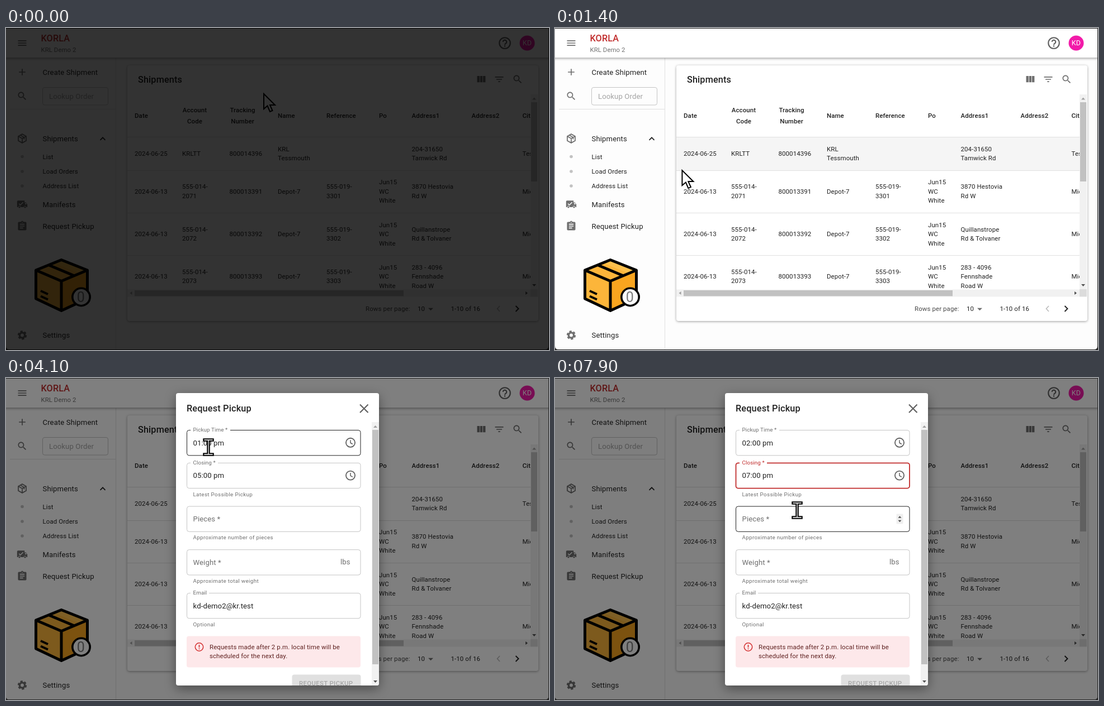
These frames come from a looping animation (971 px wide and 577 px high, 8 s). An HTML page:

```html
<!DOCTYPE html>
<html lang="en">
<head>
<meta charset="utf-8">
<title>Request Pickup</title>
<style>
html,body{margin:0;width:100%;height:100%;overflow:hidden;background:#222}
svg{display:block;width:971px;height:577px}
text{font-family:Roboto,Arial,sans-serif;white-space:pre}
.bar{filter:drop-shadow(0 2px 2px rgba(0,0,0,.32))}
.card{filter:drop-shadow(0 1px 2px rgba(0,0,0,.38))}
.paper{filter:drop-shadow(0 6px 10px rgba(0,0,0,.4))}
</style>
</head>
<body>
<svg id="stage" viewBox="0 0 971 577" xmlns="http://www.w3.org/2000/svg">
  <defs>
    <clipPath id="win"><path d="M0 1H970V570Q970 576 964 576H6Q0 576 0 570Z"/></clipPath>
    <clipPath id="tableClip"><rect x="217" y="119" width="721" height="349"/></clipPath>
    <clipPath id="itemClip"><rect x="7" y="336" width="189" height="39"/></clipPath>
    <clipPath id="paperClip"><rect x="304" y="27" width="363" height="524" rx="4"/></clipPath>
  </defs>
</svg>
<script>
const NS = 'http://www.w3.org/2000/svg';
const INK = '#212121', GREY = '#6f6f6f', RED = '#c02b2b', SOFT = '#c4c4c4';
const REM = 13.1, SMALL = 11.45, TINY = 9.83;

function el(parent, tag, attrs = {}, str) {
  const n = document.createElementNS(NS, tag);
  for (const k in attrs) n.setAttribute(k, attrs[k]);
  if (str !== undefined) n.textContent = str;
  return parent.appendChild(n);
}
const set = (n, attrs) => { for (const k in attrs) n.setAttribute(k, attrs[k]); };
const show = (n, on) => n.setAttribute('visibility', on ? 'visible' : 'hidden');
const rect = (p, x, y, width, height, fill, more) => el(p, 'rect', { x, y, width, height, fill, ...more });
const path = (p, d, fill, more) => el(p, 'path', { d, fill, ...more });
const circle = (p, cx, cy, r, fill, more) => el(p, 'circle', { cx, cy, r, fill, ...more });
const line = (p, d, stroke, w = 1, more) => path(p, d, 'none', { stroke, 'stroke-width': w, ...more });

// Text placed by the middle of its capitals.
function text(p, x, cy, str, size = REM, fill = INK, more) {
  return el(p, 'text', { x, y: cy + size * 0.355, 'font-size': size, fill,
    'letter-spacing': size * 0.0095, ...more }, str);
}
const bold = { 'font-weight': 500 };
const mid = { 'text-anchor': 'middle' };
// 24-unit icon cell centred on a point.
const icon = (p, cx, cy, size) => el(p, 'g', {
  transform: `translate(${cx - size / 2} ${cy - size / 2}) scale(${size / 24})` });

const GLASS = 'M15.5 14h-.79l-.28-.27C15.41 12.59 16 11.11 16 9.5 16 5.91 13.09 3 9.5 3S3 5.91 3 9.5 5.91 16 9.5 16c1.61 0 3.09-.59 4.23-1.57l.27.28v.79l5 4.99L20.49 19zM9.5 14C7.01 14 5 11.99 5 9.5S7.01 5 9.5 5 14 7.01 14 9.5 11.99 14 9.5 14z';
const BOARD = 'M19 3h-4.18C14.4 1.84 13.3 1 12 1s-2.4.84-2.82 2H5c-1.1 0-2 .9-2 2v14c0 1.1.9 2 2 2h14c1.1 0 2-.9 2-2V5c0-1.1-.9-2-2-2zm-7 0c.55 0 1 .45 1 1s-.45 1-1 1-1-.45-1-1 .45-1 1-1zm2 14H7v-2h7zm3-4H7v-2h10zm0-4H7V7h10z';
const tri = (p, x, y, w, h, fill = '#505050') => path(p, `M${x - w} ${y + h / 2}L${x} ${y - h / 2}L${x + w} ${y + h / 2}Z`, fill);
const side = (p, x, y, w, fill = '#505050') => path(p, `M${x - w / 2} ${y - 3}L${x + w / 2} ${y}L${x - w / 2} ${y + 3}Z`, fill);

const stage = document.getElementById('stage');
rect(stage, 0, 0, 971, 577, '#222');
const win = el(stage, 'g', { 'clip-path': 'url(#win)' });
rect(win, 0, 0, 971, 577, '#fdfdfd');

// Sidebar
rect(win, 196, 54, 1, 523, '#e0e0e0');
const itemHover = rect(win, 7, 336, 189, 39, '#000', { opacity: 0.055 });
const ripple = circle(el(win, 'g', { 'clip-path': 'url(#itemClip)' }), 115, 346, 18, '#000');
path(icon(win, 29, 79, 20), 'M19 13h-6v6h-2v-6H5v-2h6V5h2v6h6z', GREY);
text(win, 65.5, 79, 'Create Shipment');
path(icon(win, 29, 122, 20), GLASS, GREY);
rect(win, 65.5, 106.5, 117, 31.5, 'none', { rx: 3.5, stroke: SOFT });
text(win, 77, 122, 'Lookup Order', REM, '#a3a3a3');
rect(win, 7, 145, 189, 1, '#e0e0e0');
line(icon(win, 29, 198, 21), 'M12 3 20 7.5v9L12 21 4 16.5v-9zM4 7.5l8 4.5 8-4.5M12 12v9M8 5.2l8 4.6v4', GREY, 2);
text(win, 65.5, 198, 'Shipments');
line(win, 'M168.5 200.8L173 196.3L177.500 200.8', INK, 1.7);
['List', 'Load Orders', 'Address List'].forEach((s, i) => {
  const y = [230.500, 257, 283][i];
  circle(win, 29, y, 2.8, '#c2c2c2');
  text(win, 65.5, y, s, SMALL);
});
const truck = icon(win, 29, 316, 20);
path(truck, 'M3 4h14v4h3l3 4v6H1V6q0-2 2-2z', GREY);
line(truck, 'M5 10.500l3 3 6-6', '#fff', 1.8);
path(truck, 'M18 9.500h2l2 2.500h-4z', '#fff');
for (const x of [6, 18]) circle(truck, x, 18, 2.4, GREY, { stroke: '#fdfdfd', 'stroke-width': 1 });
text(win, 65.5, 316, 'Manifests');
path(icon(win, 29, 355, 20), BOARD, GREY);
text(win, 65.5, 355, 'Request Pickup');
const gear = icon(win, 29, 550.500, 20);
circle(gear, 12, 12, 5.5, 'none', { stroke: GREY, 'stroke-width': 4 });
circle(gear, 12, 12, 8.3, 'none', { stroke: GREY, 'stroke-width': 3, 'stroke-dasharray': '5 3.69' });
text(win, 65.5, 550.500, 'Settings');

// Parcel with counter
path(win, 'M99 416L146 434V485L99 506.500L53.500 485V434Z', '#fcb53a');
path(win, 'M99 454L146 434V485L99 506.500Z', '#f9a51f');
path(win, 'M86 421L98 416.500L146 434L133 440Z', '#fdc04d');
line(win, 'M99 415.500L145.500 434V485L99 506.500L53.500 485V434ZM53.500 434L99 453.500L145.500 434M99 453.500V506.500M77 425L121 443.500',
  '#000', 5, { 'stroke-linejoin': 'round' });
line(win, 'M62 471L75 477M62 480.500L75 486.500', '#000', 4);
circle(win, 134.500, 482, 15.700, '#fff', { stroke: '#000', 'stroke-width': 3.600 });
text(win, 134, 482, '0', 25, '#7a7a7a', mid);

// Top bar
rect(win, -10, -10, 991, 63, '#fff', { class: 'bar' });
path(icon(win, 29, 27, 20), 'M3 18h18v-2H3zm0-5h18v-2H3zm0-7v2h18V6z', GREY);
text(win, 62.500, 18.500, 'KORLA', 16.2, RED, bold);
text(win, 62.500, 39, 'KRL Demo 2', 11.3, '#707070');
const help = icon(win, 892, 27, 26);
circle(help, 12, 12, 9, 'none', { stroke: '#616161', 'stroke-width': 2 });
line(help, 'M9 10a3 3 0 1 1 4.800 2.400Q12 13.600 12 15M12 16v2', '#616161', 2);
circle(win, 932, 27, 13.500, '#f21ba9');
text(win, 932, 27, 'KD', 12.500, '#fff', mid);

// Table card
rect(win, 217, 67, 735, 458, '#fff', { rx: 4, class: 'card' });
text(win, 236, 92, 'Shipments', 16.2, INK, bold);
path(icon(win, 849.500, 92, 21), 'M10 18h5V5h-5zM4 18h5V5H4zM16 5v13h5V5z', GREY);
path(icon(win, 882, 92, 20), 'M10 18h4v-2h-4zM3 6v2h18V6zm3 7h12v-2H6z', GREY);
path(icon(win, 915, 92, 20), GLASS, GREY);

const table = el(win, 'g', { 'clip-path': 'url(#tableClip)' });
const rowTop = [195, 255, 331, 407, 483];
const rowHover = rect(table, 217, 0, 721, 60, '#000', { opacity: 0.04 });
const colX = [230, 315, 399.500, 486, 573, 667, 725.500, 832.500, 923.500];
['Date', '', '', 'Name', 'Reference', 'Po', 'Address1', 'Address2', 'City'].forEach((s, i) =>
  text(table, colX[i], 156.500, s, SMALL, INK, bold));
[[337.500, 'Account', 'Code'], [423, 'Tracking', 'Number']].forEach(([x, a, b]) => {
  text(table, x, 146.500, a, SMALL, INK, { ...bold, ...mid });
  text(table, x, 166.500, b, SMALL, INK, { ...bold, ...mid });
});
const po = 'Jun15|WC|White';
const order = (n, addr) => ['2024-06-13', '555-014-|207' + n, '80001339' + n, 'Depot-7',
  '555-019-|330' + n, po, addr, '', 'Midwell'];
const rows = [
  ['2024-06-25', 'KRLTT', '800014396', 'KRL|Tessmouth', '', '', '204-31650|Tamwick Rd', '', 'Tessmouth'],
  order(1, '3870 Hestovia|Rd W'),
  order(2, 'Quillanstrope|Rd & Tolvaner'),
  order(3, '283 - 4096|Fennshade|Road W')
];
rows.forEach((row, r) => {
  const cy = [225, 292.500, 369, 445][r];
  rect(table, 217, rowTop[r], 721, 1, '#e0e0e0');
  row.forEach((cell, c) => {
    const parts = cell.split('|');
    parts.forEach((s, i) => text(table, colX[c], cy + (i - (parts.length - 1) / 2) * 16.500, s, SMALL));
  });
});

rect(win, 938, 119, 13, 349, '#f1f1f1');
rect(win, 939, 133, 11, 142, '#c1c1c1');
tri(win, 944.500, 126.500, 3.500, 4, '#a0a0a0');
tri(win, 944.500, 461, 3.500, -4);
rect(win, 217, 468.500, 721, 13, '#f1f1f1');
rect(win, 230, 470, 481, 10.500, '#c1c1c1');
side(win, 223.500, 475, -4, '#a0a0a0');
side(win, 931, 475, 4);
rect(win, 938, 468, 13, 13.500, '#dcdcdc');

text(win, 643, 503, 'Rows per page:', SMALL, '#4a4a4a');
text(win, 736, 502.500, '10', SMALL);
tri(win, 759.500, 504, 4.500, -4.500, GREY);
text(win, 795.500, 503, '1-10 of 16', SMALL);
line(win, 'M883 498L878.500 503L883 508', '#bdbdbd', 1.700);
line(win, 'M911.500 498L916.500 503L911.500 508', INK, 1.900);

// Dialog
const modal = el(win, 'g');
rect(modal, 0, 0, 971, 577, '#000', { opacity: 0.5 });
rect(modal, 304, 27, 363, 524, '#fff', { rx: 4, class: 'paper' });
const paper = el(modal, 'g', { 'clip-path': 'url(#paperClip)' });
text(paper, 323, 54, 'Request Pickup', 16.3, INK, bold);
line(paper, 'M633 47.500L647.500 62M647.500 47.500L633 62', '#616161', 2.200);

function field(y, label, o) {
  const f = { y };
  f.box = rect(paper, 323.500, y, 310.500, 45.300, 'none', { rx: 4 });
  if (o.value) {
    rect(paper, 330, y - 2, o.notch, 5, '#fff');
    f.label = text(paper, 334.500, y - 0.800, label, TINY, GREY);
    f.value = text(paper, 334.500, y + 22.500, o.value);
  } else f.label = text(paper, 334.500, y + 22.500, label, REM, GREY);
  if (o.clock) {
    const k = icon(paper, 616, y + 22.300, 21.500);
    circle(k, 12, 12, 9, 'none', { stroke: '#616161', 'stroke-width': 2 });
    line(k, 'M12 7v5.500l4.300 2.500', '#616161', 1.700);
  }
  if (o.hint) text(paper, 334.500, y + 56, o.hint, TINY, GREY, { 'letter-spacing': 0.33 });
  return f;
}
const pickup = field(93.500, 'Pickup Time *', { value: '01:00 pm', notch: 71, clock: true });
const closing = field(152.300, 'Closing *', { value: '05:00 pm', notch: 49, clock: true, hint: 'Latest Possible Pickup' });
const pieces = field(230, 'Pieces *', { hint: 'Approximate number of pieces' });
const weight = field(307.700, 'Weight *', { hint: 'Approximate total weight' });
const email = field(385.500, 'Email', { value: 'kd-demo2@kr.test', notch: 33, hint: 'Optional' });
const fields = [pickup, closing, pieces, weight, email];
text(paper, 598, 329.500, 'lbs', REM, GREY);

const spin = el(paper, 'g');
rect(spin, 610.500, 243.500, 12, 18, '#efefef', { rx: 1 });
tri(spin, 616.500, 249, 3, 3.500);
tri(spin, 616.500, 256.500, 3, -3.500);
const caret = rect(paper, 349, 0, 1, 15, '#000');

rect(paper, 323, 462.500, 311, 56, '#fde8ea', { rx: 4 });
circle(paper, 345.500, 482, 7.200, 'none', { stroke: '#d32f2f', 'stroke-width': 1.500 });
line(paper, 'M345.500 478v5M345.500 484.500v1.700', '#d32f2f', 1.600);
text(paper, 364, 482, 'Requests made after 2 p.m. local time will be', SMALL, '#5f2120');
text(paper, 364, 498.300, 'scheduled for the next day.', SMALL, '#5f2120');
const button = rect(paper, 511.500, 531.500, 123, 30, '#e0e0e0', { rx: 4 });
const buttonText = text(paper, 524, 546.500, 'REQUEST PICKUP', SMALL, '#a6a6a6', { ...bold, 'letter-spacing': 0.33 });

rect(paper, 654, 79, 13, 472, '#f1f1f1');
rect(paper, 655, 93, 11, 420, '#c1c1c1');
tri(paper, 660.500, 87, 3.500, 4, '#a0a0a0');
tri(paper, 660.500, 544, 3.500, -4);

// Pointers
const arrow = path(win, 'M1 1V28L7.500 22.500L12 33L16.500 31L12 21H21Z', '#fff', { stroke: '#000', 'stroke-width': 2 });
const beam = el(win, 'g');
for (const [color, w] of [['#000', 5.500], ['#fff', 1.300]])
  line(beam, 'M-7 -13H7M-7 13H7M0 -13V13', color, w, { 'stroke-linecap': 'square' });

const shade = rect(stage, 0, 0, 971, 577, '#000');

// time, x, y
const route = [
  [0, 460, 117], [700, 460, 117], [1800, 126, 313], [1900, 122, 324], [2000, 122, 324],
  [2100, 115, 346], [3200, 115, 346], [4100, 362, 124], [4200, 347, 117], [4400, 345, 106],
  [5400, 345, 106], [5700, 428, 125], [6200, 428, 125], [6500, 352, 166], [6700, 350, 163],
  [7600, 350, 163], [7900, 433, 237], [8000, 433, 237]
];
const clamp = v => Math.max(0, Math.min(1, v));
const ease = v => { v = clamp(v); return v * v * (3 - 2 * v); };
function pointer(t) {
  const i = Math.max(1, route.findIndex(k => k[0] > t));
  const [t0, x0, y0] = route[i - 1], [t1, x1, y1] = route[i];
  const p = ease((t - t0) / (t1 - t0));
  return [x0 + (x1 - x0) * p, y0 + (y1 - y0) * p];
}
const menuRows = [[59, 99], [178, 218], [218, 244], [244, 270], [270, 296], [296, 336], [336, 375]];

function render(t) {
  const [x, y] = pointer(t);
  const open = t >= 2500;
  set(shade, { opacity: 0.8 * clamp(1 - t / 400) });

  const item = menuRows.find(r => x < 196 && y >= r[0] && y < r[1]);
  show(itemHover, item && t < 3000);
  if (item) set(itemHover, { y: item[0], height: item[1] - item[0] });
  const row = x > 217 && y < 468 ? rowTop.findIndex((v, i) => y >= v && y < rowTop[i + 1]) : -1;
  show(rowHover, !open && row >= 0);
  if (row >= 0) set(rowHover, { y: rowTop[row], height: rowTop[row + 1] - rowTop[row] });

  const press = (t - 2400) / 300;
  show(ripple, press >= 0 && press < 1);
  set(ripple, { r: 8 + 30 * clamp(press), opacity: 0.22 * (1 - clamp(press * press)) });

  show(modal, open);
  set(modal, { opacity: ease((t - 2470) / 220) });
  set(button, { fill: t < 2600 ? '#d32f2f' : '#e0e0e0' });
  set(buttonText, { fill: t < 2600 ? '#fff' : '#a6a6a6' });

  const focus = t >= 6700 ? closing : t >= 4400 ? pickup : null;
  const over = open && x > 323 && x < 635 ? fields.find(f => y >= f.y && y <= f.y + 45.500) : null;
  for (const f of fields) {
    const on = f === focus;
    set(f.box, { stroke: on ? RED : f === over ? INK : SOFT, 'stroke-width': on ? 1.800 : 1 });
    set(f.label, { fill: on ? RED : GREY });
  }
  pickup.value.textContent = (t < 5000 ? '01' : '02') + ':00 pm';
  closing.value.textContent = (t < 6900 ? '05' : '07') + ':00 pm';
  const since = t - [4400, 5000, 6700, 6900].filter(v => v <= t).pop();
  show(caret, focus && since % 1060 < 500);
  if (focus) set(caret, { y: focus.y + 15 });
  show(spin, open && over === pieces);

  show(arrow, !over);
  show(beam, over);
  set(over ? beam : arrow, { transform: `translate(${x} ${y})` });
}

const LOOP = 8000, STEP = 100;
const start = performance.now();
function tick() {
  const t = (performance.now() - start) % LOOP;
  render(Math.floor(t / STEP) * STEP);
  requestAnimationFrame(tick);
}
tick();
</script>
</body>
</html>
```
